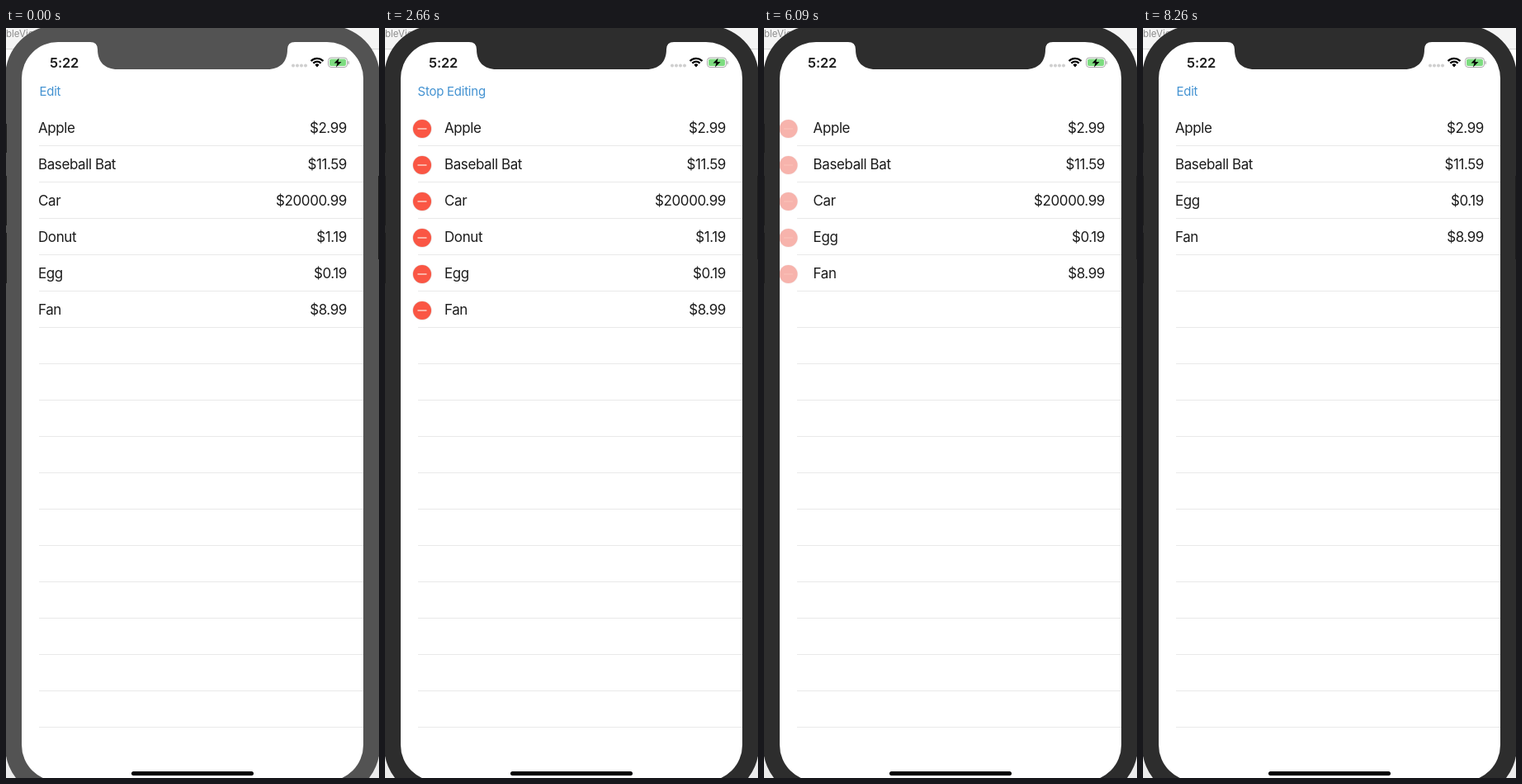
An HTML page with a canvas that plays this animation: 452 by 908 pixels, repeating every 9.38 s.

```html
<!DOCTYPE html>
<html lang="en">
<head>
<meta charset="utf-8">
<title>Editable list</title>
<style>
  html, body { margin: 0; width: 100%; height: 100%; overflow: hidden; background: #fff; }
  canvas { display: block; }
</style>
</head>
<body>
<canvas id="stage" width="452" height="908"></canvas>
<script>
const ctx = document.getElementById('stage').getContext('2d');
const LOOP = 9380, STEP = 70;
const SCREEN = { left: 19, right: 433, top: 17, bottom: 912, width: 414 };
const ROW = 44, LIST_TOP = 99, LIST_BOTTOM = 874;
const RED = '#fa5644', BLUE = '#4392d1', INK = '#1c1c1c', LINE = '#e9e9e9';

const items = [
  { name: 'Apple', price: '$2.99' },
  { name: 'Baseball Bat', price: '$11.59' },
  { name: 'Car', price: '$20000.99', slide: slideCar, removedAt: 7630 },
  { name: 'Donut', price: '$1.19', slide: slideDonut, removedAt: 4480 },
  { name: 'Egg', price: '$0.19' },
  { name: 'Fan', price: '$8.99' }
];

// Timing
const clamp = v => Math.max(0, Math.min(1, v));
const ramp = (t, start, duration) => clamp((t - start) / duration);
const ease = (t, start, duration) => {
  const u = ramp(t, start, duration);
  return u * u * (3 - 2 * u);
};
const decay = (t, start, tau) => t <= start ? 1 : Math.exp((start - t) / tau);

const editing = t => ease(t, 2000, 300) - ease(t, 5965, 300);
const rowHeight = (item, t) => item.removedAt ? Math.round(ROW * decay(t, item.removedAt, 95)) : ROW;

function slideDonut(t) {
  const s = Math.max(0, t - 3290) * 0.012;
  const reveal = 74 * (1 - (1 + s) * Math.exp(-s));
  const sweep = 1 - decay(t, 4480, 45);
  const x = reveal + (SCREEN.width - reveal) * sweep;
  return { button: x, label: x };
}

function slideCar(t) {
  return {
    button: SCREEN.width * ease(t, 7390, 290),
    label: SCREEN.width * ease(t, 7458, 290)
  };
}

// Drawing helpers
function rect(color, x, y, w, h, r = 0) {
  ctx.fillStyle = color;
  ctx.beginPath();
  ctx.roundRect(x, y, w, h, r);
  ctx.fill();
}

function dot(color, x, y, r) {
  ctx.fillStyle = color;
  ctx.beginPath();
  ctx.arc(x, y, r, 0, Math.PI * 2);
  ctx.fill();
}

function text(str, x, y, { size = 17, weight = 400, color = INK, align = 'left', tracking = -0.41 } = {}) {
  ctx.font = `${weight} ${size}px Inter, sans-serif`;
  ctx.letterSpacing = tracking + 'px';
  ctx.textAlign = align;
  ctx.fillStyle = color;
  ctx.fillText(str, x, y);
}

function clipped(x, y, w, h, r, draw) {
  ctx.save();
  ctx.beginPath();
  ctx.roundRect(x, y, w, h, r);
  ctx.clip();
  draw();
  ctx.restore();
}

function faded(alpha, draw) {
  ctx.save();
  ctx.globalAlpha = alpha;
  draw();
  ctx.restore();
}

// Scene parts
function drawDesktop() {
  rect('#fff', 0, 0, 452, 908);
  rect('#f4f4f4', 0, 0, 452, 25);
  rect('#d6d6d6', 0, 25, 452, 1);
  rect('#ececec', 0, 860, 452, 48);
  text('bleView', 0, 11, { size: 11.5, color: '#8c8c8c', tracking: 0 });
}

function drawBezel(color) {
  rect(color, -1, -3, 454, 935, 62);
  for (const [x, y, h] of [[0, 116, 35], [0, 179, 60], [0, 248, 61], [451, 179, 101]])
    rect('#1d1d1d', x, y, 1, h);
}

function drawNotch(color) {
  ctx.fillStyle = color;
  ctx.beginPath();
  ctx.moveTo(102, 16);
  ctx.lineTo(102, 17);
  ctx.quadraticCurveTo(111, 17, 111, 26);
  ctx.bezierCurveTo(111, 41, 120, 50, 135, 50);
  ctx.lineTo(317, 50);
  ctx.bezierCurveTo(332, 50, 341, 41, 341, 26);
  ctx.quadraticCurveTo(341, 17, 350, 17);
  ctx.lineTo(350, 16);
  ctx.fill();
}

function drawStatusBar() {
  text('5:22', 53, 47.5, { size: 16.5, weight: 600, tracking: -0.2 });
  for (let i = 0; i < 4; i++) dot('#cfcfcf', 348 + i * 5, 45.5, 2);

  // Wi-Fi fan
  ctx.strokeStyle = '#000';
  ctx.lineWidth = 2.3;
  for (const r of [10.2, 6.4]) {
    ctx.beginPath();
    ctx.arc(377, 47, r, -Math.PI * 0.76, -Math.PI * 0.24);
    ctx.stroke();
  }
  ctx.fillStyle = '#000';
  ctx.beginPath();
  ctx.moveTo(377, 47.5);
  ctx.arc(377, 47, 3.5, -Math.PI * 0.76, -Math.PI * 0.24);
  ctx.fill();

  // Battery
  ctx.strokeStyle = '#a9a9a9';
  ctx.lineWidth = 1;
  ctx.beginPath();
  ctx.roundRect(390.5, 36, 23, 11.5, 3.5);
  ctx.stroke();
  rect('#a9a9a9', 414.5, 40, 1.3, 4, 1);
  rect('#7ddc80', 392, 37.5, 20, 8.5, 2);
  ctx.fillStyle = '#000';
  ctx.beginPath();
  [[403.5, 36.5], [397.5, 42.5], [401.4, 42.5], [400, 47.5], [406.5, 41], [402.5, 41]]
    .forEach(p => ctx.lineTo(...p));
  ctx.fill();
}

function drawHeader(t) {
  const stop = t >= 2030 && t < 6020;
  let alpha = 1;
  if (t < 2030) alpha = t < 1820 ? 1 : 0.2;
  else if (stop) alpha = t < 5880 ? ramp(t, 2150, 220) : 0.2;
  else alpha = ramp(t, 6140, 220);
  faded(alpha, () => text(stop ? 'Stop Editing' : 'Edit', stop ? 39.5 : 40.5, 81.5,
    { size: 15, color: BLUE, tracking: -0.24 }));
}

function drawMinus(x, y, alpha) {
  faded(alpha, () => {
    dot('#e3d4d2', x, y, 11.6);
    dot(RED, x, y, 11);
    rect('#fdd0c6', x - 5.5, y - 0.75, 11, 1.5);
  });
}

function drawRow(item, top, height, t) {
  const edit = editing(t);
  const slide = item.slide ? item.slide(t) : { button: 0, label: 0 };
  const base = top + 28;
  clipped(SCREEN.left, top, SCREEN.width, height, 0, () => {
    const dx = slide.button;
    rect(LINE, 40 - dx, top + 43, 393, 1);
    if (edit > 0) drawMinus(4 + 41 * edit - dx, top + 23, edit * edit);
    text(item.name, 39 + 33 * edit - dx, base);
    text(item.price, 413 - dx, base, { align: 'right' });
    if (dx > 0) {
      rect(RED, SCREEN.right - dx, top, dx, 43);
      const pressed = item.name === 'Donut' && t >= 4410;
      text('Delete', SCREEN.right - slide.label + 14, top + 27.5,
        { size: 15, weight: 500, color: pressed ? '#fddcd5' : '#fff', tracking: -0.24 });
    }
  });
}

function drawList(t) {
  let top = LIST_TOP;
  for (const item of items) {
    const height = rowHeight(item, t);
    if (height > 0) drawRow(item, top, height, t);
    top += height;
  }
  for (let y = top + ROW - 1; y < LIST_BOTTOM; y += ROW) rect(LINE, 40, y, 393, 1);
}

function draw(t) {
  const bezel = t < 1680 ? '#535353' : '#2d2d2d';
  drawDesktop();
  drawBezel(bezel);
  clipped(SCREEN.left, SCREEN.top, SCREEN.width, SCREEN.bottom - SCREEN.top, 44, () => {
    rect('#fff', SCREEN.left, SCREEN.top, SCREEN.width, 900);
    drawList(t);
    drawHeader(t);
    drawStatusBar();
    rect('#000', 152, 900, 148, 5, 2.5);
  });
  drawNotch(bezel);
}

const start = performance.now();
function tick() {
  const t = (performance.now() - start) % LOOP;
  draw(Math.floor(t / STEP) * STEP);
  requestAnimationFrame(tick);
}
tick();
</script>
</body>
</html>
```
